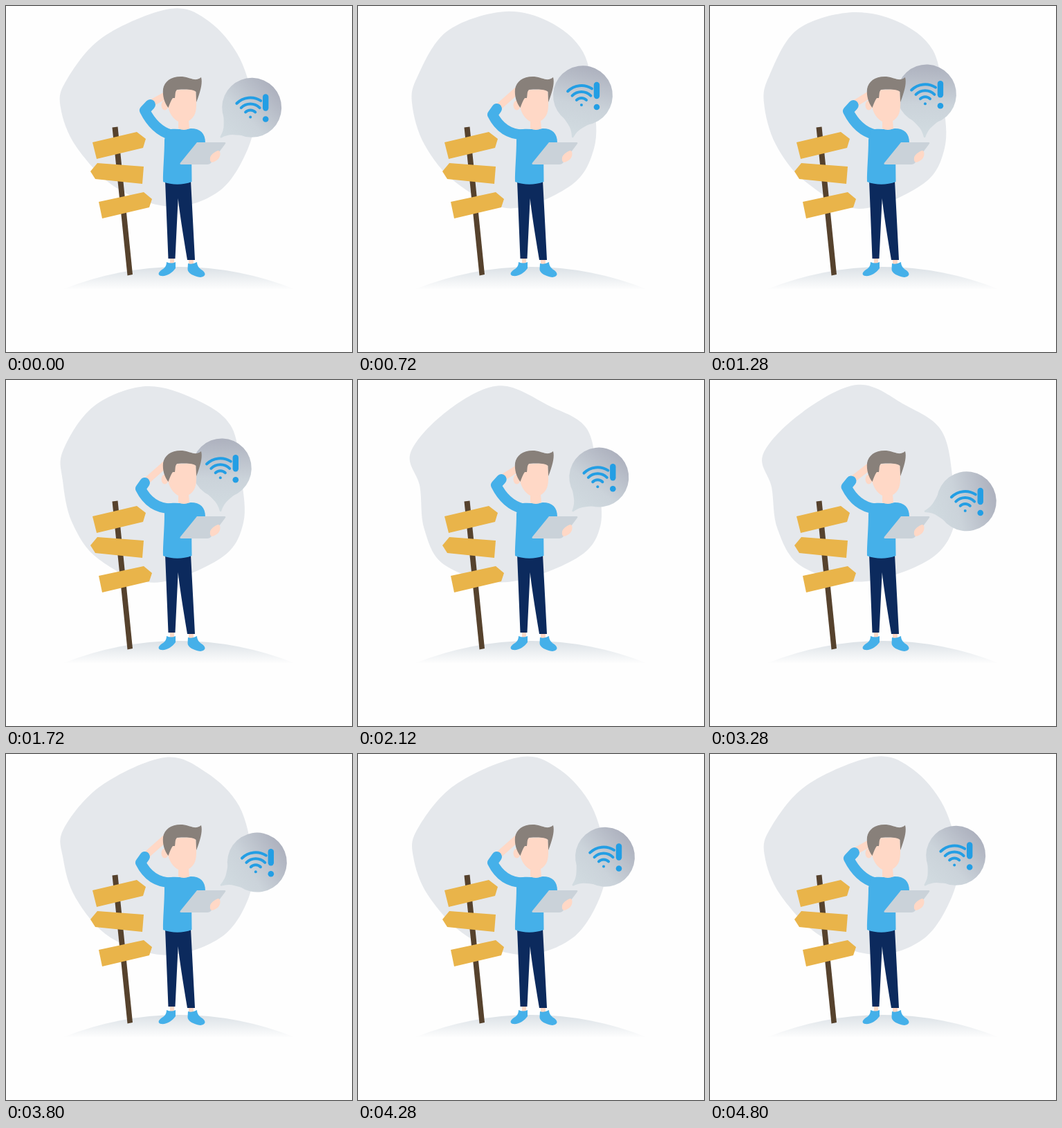
Animation, 500 px wide and 500 px high, one loop 4840 ms. Source, as an HTML page with a canvas:

```html
<!DOCTYPE html>
<html lang="en">
<head>
<meta charset="utf-8">
<title>Lost connection</title>
<style>
html, body { margin: 0; width: 100%; height: 100%; overflow: hidden; background: #fefefe; }
canvas { display: block; width: 500px; height: 500px; }
</style>
</head>
<body>
<canvas id="stage" width="500" height="500"></canvas>
<script>
const ctx = document.getElementById('stage').getContext('2d');
const LOOP = 4840, STEP = 40;
const PAPER = '#fefefe', BLUE = '#45b0e9', SKIN = '#ffd8c6', WOOD = '#e9b44a', ALERT = '#239ee4';

// Key points of the three backdrop outlines, clockwise from the top.
const ROUND = [237,4, 293,22, 338,76, 358,150, 350,205, 310,266, 240,290, 160,263, 102,204, 79,147, 87,108, 140,45];
const EGG = [200,9.5, 270,22, 322,64, 337,140, 339,205, 308,257, 215,293, 138,254, 95,200, 78,140, 86,100, 125,35];
const STAR = [205,8, 278,42, 333,72, 348,140, 354,212, 318,258, 212,292, 122,272, 96,220, 93,158, 73,106, 130,48];

const mix = (a, b, k) => a + (b - a) * k;
const mixAll = (a, b, k) => a.map((v, i) => mix(v, b[i], k));
const clamp = v => Math.min(1, Math.max(0, v));

// cubic-bezier(.25, .1, .25, 1)
function ease(x) {
  const bez = (a, b, s) => 3 * a * s * (1 - s) ** 2 + 3 * b * s * s * (1 - s) + s ** 3;
  let lo = 0, hi = 1;
  for (let i = 0; i < 24; i++) {
    const mid = (lo + hi) / 2;
    if (bez(0.25, 0.25, mid) < x) lo = mid; else hi = mid;
  }
  return bez(0.1, 1, lo);
}

// Eases first -> second -> third -> first, with the turns at p = a and p = b.
function cycle(p, a, b, poses, blend) {
  const [first, second, third] = poses;
  if (p < a) return blend(first, second, ease(p / a));
  if (p < b) return blend(second, third, ease((p - a) / (b - a)));
  return blend(third, first, ease((p - b) / (1 - b)));
}

function fill(color, d) {
  ctx.fillStyle = color;
  ctx.fill(new Path2D(d));
}

function poly(color, ...points) {
  fill(color, 'M' + points.join(' ') + 'Z');
}

function disc(color, x, y, rx, ry = rx) {
  ctx.fillStyle = color;
  ctx.beginPath();
  ctx.ellipse(x, y, rx, ry, 0, 0, Math.PI * 2);
  ctx.fill();
}

function drawBackdrop(p) {
  const points = cycle(p, 0.3, 0.6, [ROUND, EGG, STAR], mixAll);
  const n = points.length / 2;
  const at = i => [points[((i + n) % n) * 2], points[((i + n) % n) * 2 + 1]];
  ctx.beginPath();
  ctx.moveTo(...at(0));
  for (let i = 0; i < n; i++) {
    const [a, b, c, d] = [at(i - 1), at(i), at(i + 1), at(i + 2)];
    ctx.bezierCurveTo(b[0] + (c[0] - a[0]) / 6, b[1] + (c[1] - a[1]) / 6,
      c[0] - (d[0] - b[0]) / 6, c[1] - (d[1] - b[1]) / 6, c[0], c[1]);
  }
  ctx.fillStyle = '#e5e8ec';
  ctx.fill();
}

function drawGround() {
  const shade = ctx.createLinearGradient(0, 377, 0, 410);
  shade.addColorStop(0, '#dbe1e6');
  shade.addColorStop(1, PAPER);
  fill(shade, 'M82 409.5A451 451 0 0 1 418 409.5Z');
}

function drawBubble(p) {
  const angle = cycle(p, 0.35, 0.66, [-43.7, -89, -12.5], mix) * Math.PI / 180;
  const reach = 62.5, radius = 43;
  ctx.save();
  ctx.translate(310, 190);
  ctx.rotate(angle);
  const shade = ctx.createLinearGradient(0, 0, reach + radius, 0);
  shade.addColorStop(0, '#d2dce1');
  shade.addColorStop(0.45, '#cbd3da');
  shade.addColorStop(1, '#adb1be');
  fill(shade, 'M0 -1Q11 -4 17 -11Q22 -16 32 -28L32 28Q22 16 17 11Q11 4 0 1Z');
  disc(shade, reach, 0, radius);
  ctx.restore();

  ctx.save();
  ctx.translate(310 + reach * Math.cos(angle), 190.7 + reach * Math.sin(angle));
  drawWarning();
  ctx.restore();
}

function drawWarning() {
  ctx.strokeStyle = ALERT;
  ctx.lineCap = 'round';
  ctx.lineWidth = 4;
  for (const radius of [28, 19, 10]) {
    const end = radius > 20 ? 0.32 : 0.25;
    ctx.beginPath();
    ctx.arc(-2, 13, radius, -0.75 * Math.PI, -end * Math.PI);
    ctx.stroke();
  }
  disc(ALERT, -2, 13, 2);
  ctx.lineWidth = 8.4;
  ctx.beginPath();
  ctx.moveTo(20, -16);
  ctx.lineTo(20, 0);
  ctx.stroke();
  disc(ALERT, 20, 16, 4.3);
}

function drawSigns() {
  poly('#56422d', 153.5, 175.5, 161.5, 174.5, 183, 388, 175.5, 389.5);
  poly(WOOD, 125, 197, 189, 182, 202, 192, 198, 205, 131, 221);
  poly(WOOD, 132, 227, 199, 232, 197, 257, 129, 250, 122, 239);
  poly(WOOD, 134, 283, 199, 269, 211, 279, 207, 291, 139, 307);
}

// The elbow rises four times per loop, resting at both ends.
function drawRaisedArm(p) {
  const lift = clamp(1.75 * Math.cos(2 * Math.PI * (4 * p - 0.905)) - 0.165);
  const elbow = mixAll([194.5, 157], [200.5, 151], lift);
  const cuff = mixAll([200.5, 148.5], [208.5, 142.5], lift);
  const hand = mixAll([230, 122], [229, 130], lift);
  ctx.lineJoin = ctx.lineCap = 'round';
  ctx.strokeStyle = SKIN;
  ctx.lineWidth = 10;
  ctx.beginPath();
  ctx.moveTo(cuff[0] + 3, cuff[1] - 3);
  ctx.lineTo(...hand);
  ctx.stroke();
  ctx.strokeStyle = BLUE;
  ctx.lineWidth = 15;
  ctx.beginPath();
  ctx.moveTo(...cuff);
  ctx.lineTo(...elbow);
  ctx.quadraticCurveTo(elbow[0] + 14, elbow[1] + 28, 238, 186);
  ctx.stroke();
}

function drawPerson(p) {
  // Legs and feet
  poly(SKIN, 237, 363, 243, 363, 243, 373, 237, 373);
  poly(SKIN, 264, 365, 271, 365, 271, 375, 264, 375);
  fill('#0c2a5d', 'M230 252L267 252L273 367L262 367Q251.5 305 248.7 278L244.5 365L234.5 365Z');
  fill(BLUE, 'M232 370Q239 373 245 370L245 379C240 386 232 391 224 390C219 389 220 385 224 382C229 379 232 376 232 370Z');
  fill(BLUE, 'M263 372Q269 374 276 370C276 377 281 380 285 383C290 388 287 391 281 392C272 391 262 386 262.5 380Z');

  // Body
  drawRaisedArm(p);
  fill(BLUE, 'M233 179C245 176 255 180 267 177C281 177 288 184 288 198L278 214L268 208L268.5 254C255 259 240 259 227 254C226.5 240 229 215 229 193Z');

  // Head
  fill(SKIN, 'M249 160L249 177Q257 181 265 177L263.5 160Z');
  fill(SKIN, 'M233 122L274 120C275.5 140 276 150 272 158C266 168 256 171 247 166C238 160 234.5 150 233 140Z');
  disc(SKIN, 229.5, 143.5, 5, 7);
  fill('#88807a', 'M234.5 147C229 140 226 130 227 120C229 108 240 101 255 102C264 103 270 107 276 106Q280 105 282 103C284 110 282 120 277 134L275 139L274.5 124C270 120.5 262 120 247 121C244 124 245 128 244 133L241 133C238 137 237 141 234.5 147Z');

  // Tablet and hand
  fill('#cad2d9', 'M276 197L316 197Q318 197 317 199L296 227Q294 229 291 229L253 229Q250.5 229 252 226.5Z');
  fill(SKIN, 'M295 219C296 215 300 212 304 210Q309 207 309.5 213C310 220 304 225 297 226Q294 224 295 219Z');
}

function draw(time) {
  const p = Math.floor((time % LOOP) / STEP) * STEP / LOOP;
  ctx.fillStyle = PAPER;
  ctx.fillRect(0, 0, 500, 500);
  drawBackdrop(p);
  drawGround();
  drawBubble(p);
  drawSigns();
  drawPerson(p);
}

let start;
function tick(now) {
  start ??= now;
  draw(Math.max(0, now - start));
  requestAnimationFrame(tick);
}
draw(0);
requestAnimationFrame(tick);
</script>
</body>
</html>
```
